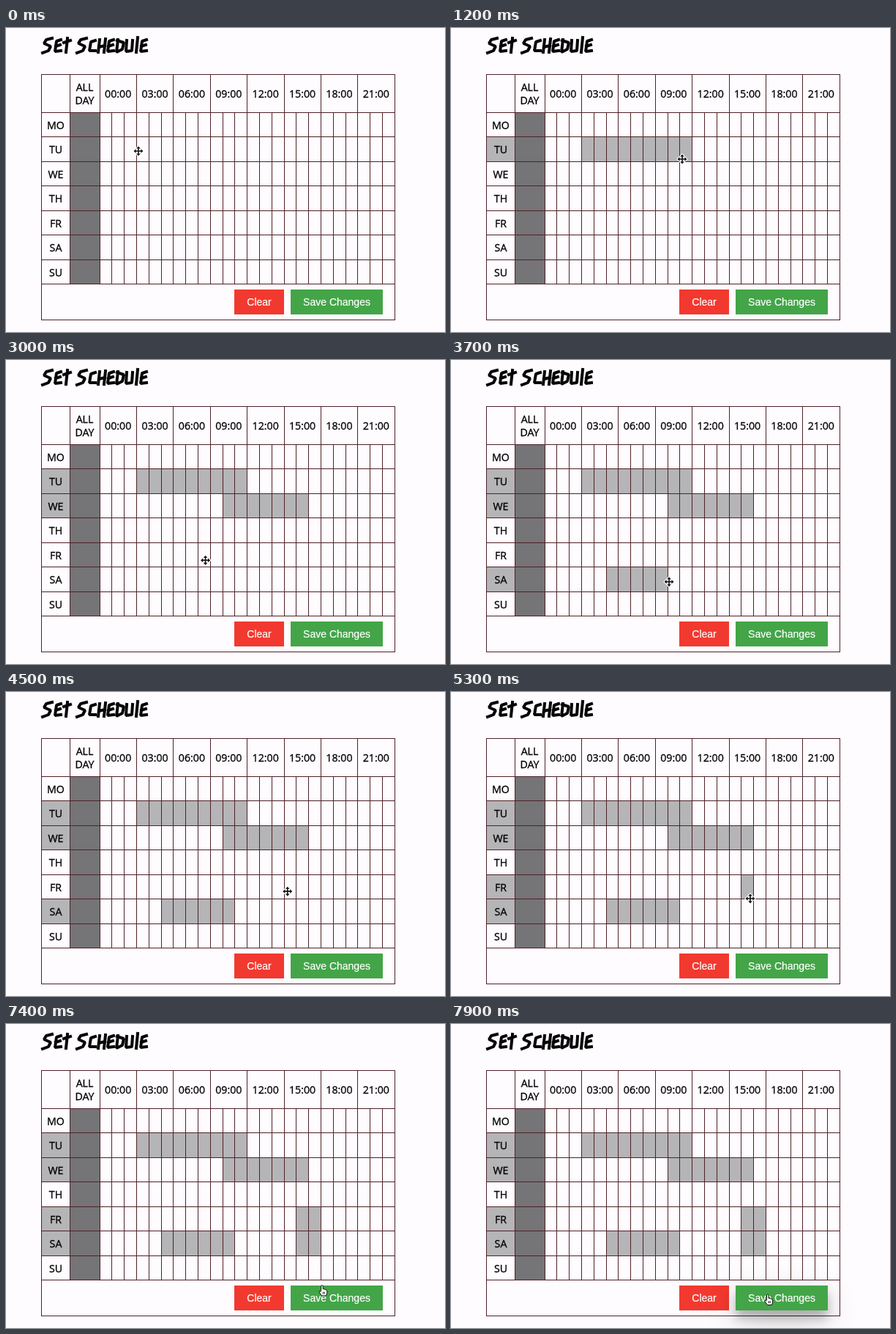
Write an HTML page that moves like this. It is 600x415 px and loops after 8000 ms.

```html
<!DOCTYPE html>
<html lang="en">
<head>
<meta charset="utf-8">
<title>Set Schedule</title>
<style>
  html, body { margin: 0; width: 100%; height: 100%; overflow: hidden; background: #fefcfe; }
  #stage { position: relative; width: 600px; height: 415px; overflow: hidden; }
  svg { position: absolute; left: 0; top: 0; }
  #title { fill: none; stroke: #050505; stroke-width: 4; stroke-linecap: square; stroke-linejoin: bevel; }
  #labels {
    font: 14.2px "Open Sans", "Noto Sans", sans-serif;
    fill: #000; stroke: #000; stroke-width: .3; text-anchor: middle;
  }
  #lines { fill: none; stroke: #4d2227; stroke-width: 1; }
  .day { fill: #757476; }
  .pick { fill: #b5b4b6; }
  .button {
    position: absolute; top: 357px; height: 34px;
    font: 14px/34px "Liberation Sans", Arial, sans-serif;
    color: #fff; -webkit-text-stroke: .2px #fff; text-align: center; white-space: nowrap;
  }
  #clear { left: 312px; width: 68px; background: #f2392f; }
  #save { left: 389px; width: 126px; background: #43a548; }
</style>
</head>
<body>
<div id="stage">
  <svg width="600" height="415" viewBox="0 0 600 415">
    <g id="title" role="img" aria-label="Set Schedule"></g>
    <g id="fills" shape-rendering="crispEdges"></g>
    <path id="lines" shape-rendering="crispEdges"/>
    <g id="labels"></g>
  </svg>
  <div class="button" id="clear">Clear</div>
  <div class="button" id="save">Save Changes</div>
  <svg width="600" height="415" viewBox="0 0 600 415">
    <path id="move" fill="#111" stroke="#fff" stroke-width="2.2" paint-order="stroke" stroke-linejoin="round"
      d="M0-6.5L2.8-3.4H.8V-.8H3.4V-2.8L6.5 0L3.4 2.8V.8H.8V3.4H2.8L0 6.5L-2.8 3.4H-.8V.8H-3.4V2.8L-6.5 0L-3.4-2.8V-.8H-.8V-3.4H-2.8Z"/>
    <path id="hand" fill="#fff" stroke="#111" stroke-width="1" stroke-linejoin="round"
      d="M-2.5 1V-5.4Q-2.4-6.7-1.3-6.7T0-5.4V-1.6Q1.2-2.2 2-1.1Q3.3-1.6 4-.4Q5.6-.6 5.6 1V4L4.4 7.5H-1.6L-5 2.6Q-5.6 1.1-4.2 .9L-2.5 2.4M.3 2.2V5.2M2.2 2.2V5.2"/>
  </svg>
</div>
<script>
const LOOP = 8000, STEP = 100, LAG = 20;
const HOVER = 7400, FADE = 400;
const LEFT = 48, DAY = 87, HOURS = 128, RIGHT = 531, TOP = 63, BODY = 115, FOOT = 349, BOTTOM = 398;
const COL = (RIGHT - HOURS) / 24, ROW = 33.5;
const colX = c => Math.floor(HOURS + c * COL + .2);
const rowY = r => Math.floor(BODY + r * ROW);
const smooth = k => k * k * (3 - 2 * k);
const $ = id => document.getElementById(id);

// Pointer stops: time, x, y
const stops = [
  [0, 181, 168], [300, 181, 168], [1000, 316, 179], [1200, 316, 179],
  [1800, 304, 200], [2250, 406, 202], [3400, 221, 301], [3780, 308, 303],
  [4800, 405, 264], [5300, 409, 282], [5900, 426, 294], [6700, 427, 276],
  [7600, 434, 376], [LOOP, 434, 376]
];

const drags = [
  { down: 400, up: 1200, col: 3, row: 1 },
  { down: 1900, up: 2300, col: 10, row: 2 },
  { down: 3400, up: 3800, col: 5, row: 5 },
  { down: 4800, up: 6000, col: 16, row: 4 }
];

// Brush letters: advance and strokes
const glyphs = {
  S: [17, "M13 1L5 3L2 8L11 12L8 18L0 21"],
  E: [12, "M8 3L2 5L0 19L8 18M1 12L7 10"],
  T: [18, "M5 1L3 20M0 7L9 4"],
  C: [12, "M8 4L2 6L0 18L8 18"],
  H: [13, "M2 3L0 20M1 13L9 11M10 2L8 20"],
  D: [13, "M2 3L0 20L8 16L10 7L1 4"],
  U: [14, "M1 4L0 19L8 18L9 4"],
  L: [6, "M2 0L0 20"]
};

function pointer(t) {
  const i = Math.max(1, stops.findIndex(s => s[0] >= t));
  const [t0, x0, y0] = stops[i - 1], [t1, x1, y1] = stops[i];
  const k = smooth((t - t0) / (t1 - t0));
  return [x0 + (x1 - x0) * k, y0 + (y1 - y0) * k];
}

function setAll(el, attrs) {
  for (const name in attrs) el.setAttribute(name, attrs[name]);
}

function add(parent, tag, attrs, text = "") {
  const el = document.createElementNS("http://www.w3.org/2000/svg", tag);
  setAll(el, attrs);
  el.textContent = text;
  return $(parent).appendChild(el);
}

const box = (el, x, y, right, bottom) => setAll(el, { x, y, width: right - x, height: bottom - y });
const show = (el, on) => el.style.display = on ? "" : "none";
const label = (x, y, text) => add("labels", "text", { x, y }, text);

let pen = 50;
for (const letter of "SETSCHEDULE") {
  const [advance, d] = glyphs[letter];
  add("title", "path", { d, transform: `translate(${pen} 13)` });
  pen += advance;
}

box(add("fills", "rect", { class: "day" }), DAY, BODY, HOURS, FOOT);
const marks = drags.map(() => add("fills", "rect", { class: "pick" }));
const days = ["MO", "TU", "WE", "TH", "FR", "SA", "SU"].map((name, r) => {
  const el = add("fills", "rect", { class: "pick" });
  box(el, LEFT, rowY(r), DAY, rowY(r + 1));
  label(68, 137.8 + r * ROW, name);
  return el;
});
label(107.5, 86, "ALL");
label(107.5, 104, "DAY");
for (let h = 0; h < 24; h += 3) {
  label(HOURS + (h + 1.5) * COL, 94.8, String(h).padStart(2, "0") + ":00");
}

const vline = (x, y0, y1) => `M${x + .5} ${y0}V${y1 + 1}`;
const hline = y => `M${LEFT} ${y + .5}H${RIGHT + 1}`;
let grid = vline(LEFT, TOP, BOTTOM) + vline(RIGHT, TOP, BOTTOM) + vline(DAY, TOP, FOOT);
for (let c = 0; c < 24; c++) grid += vline(colX(c), c % 3 ? BODY : TOP, FOOT);
for (let r = 0; r <= 7; r++) grid += hline(rowY(r));
$("lines").setAttribute("d", grid + hline(TOP) + hline(BOTTOM));

function draw(t) {
  const picked = new Set();
  drags.forEach(({ down, up, col, row }, i) => {
    show(marks[i], t >= down);
    if (t < down) return;
    // The selection trails the pointer slightly
    const [x, y] = pointer(Math.min(t, up) - LAG);
    const lastCol = Math.max(col, Math.floor((x - HOURS) / COL));
    const lastRow = Math.max(row, Math.floor((y - BODY) / ROW));
    box(marks[i], colX(col), rowY(row), colX(lastCol + 1), rowY(lastRow + 1));
    for (let r = row; r <= lastRow; r++) picked.add(r);
  });
  days.forEach((el, r) => show(el, picked.has(r)));

  const [x, y] = pointer(t), over = t >= HOVER;
  for (const id of ["move", "hand"]) {
    $(id).setAttribute("transform", `translate(${x} ${y})`);
    show($(id), over === (id === "hand"));
  }
  const glow = smooth(Math.min(1, Math.max(0, (t - HOVER) / FADE)));
  $("save").style.boxShadow =
    `0 ${10.5 * glow}px ${14 * glow}px rgba(0,0,0,${.24 * glow}),` +
    `0 ${15 * glow}px ${44 * glow}px rgba(0,0,0,${.19 * glow})`;
}

const start = performance.now();
function tick() {
  const t = (performance.now() - start) % LOOP;
  draw(Math.floor(t / STEP) * STEP);
  requestAnimationFrame(tick);
}
tick();
</script>
</body>
</html>
```
